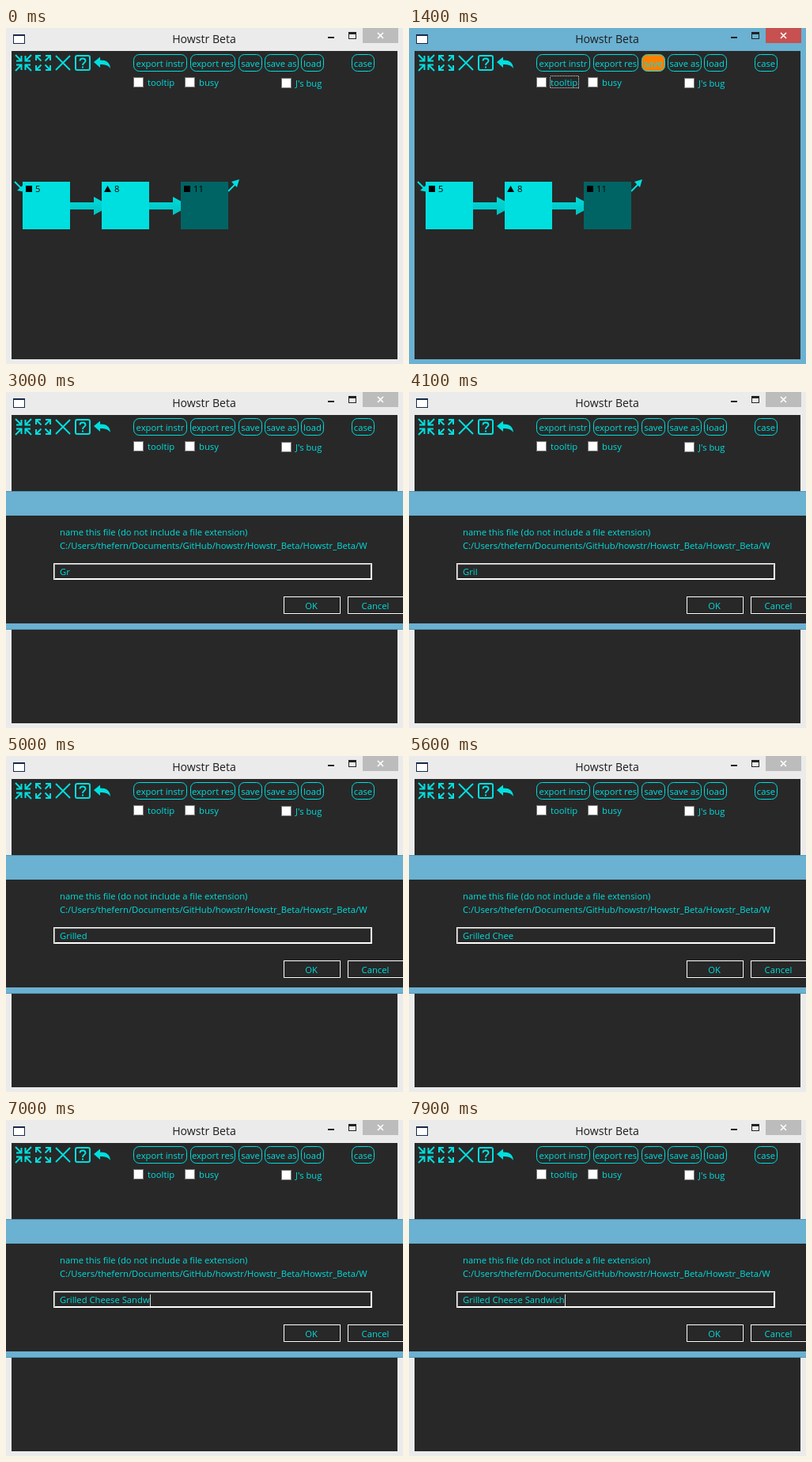
Animation, 502 px wide and 424 px high, one loop 8000 ms. Source, as an HTML page:

```html
<!DOCTYPE html>
<html lang="en">
<head>
<meta charset="utf-8">
<title>Howstr Beta</title>
<style>
  html, body { margin: 0; width: 100%; height: 100%; overflow: hidden; background: #ebebeb; }
  svg { display: block; width: 502px; height: 424px; --cyan: #00dfdf; --body: #282828; --glass: #6bb1d1; }
  text { font: 11.25px "Open Sans", "Noto Sans", sans-serif; fill: var(--cyan); white-space: pre; }
  .title { font-size: 14.1px; fill: #1c1c1c; }
  .mid { text-anchor: middle; }
  .ink, .ink text { fill: #000; }
  .line { fill: none; stroke: var(--cyan); }
  .cyan { fill: var(--cyan); }
  .body { fill: var(--body); }
  .glass { fill: var(--glass); }
  .crisp { shape-rendering: crispEdges; }
  #frame { fill: #ebebeb; }
  #close { fill: #bcbcbc; }
  #focus { display: none; }
  .active #frame { fill: var(--glass); }
  .active #close { fill: #c75050; }
  .active #focus { display: inline; }
  .active #save { fill: #ff8000; }
</style>
</head>
<body>
<svg id="stage" viewBox="0 0 502 424">
  <defs>
    <linearGradient id="shade" x2="0" y2="1">
      <stop stop-color="#00dada"/><stop offset="1" stop-color="#00c2c2"/>
    </linearGradient>
    <clipPath id="pathClip"><rect x="62" y="184" width="401" height="20"/></clipPath>
    <g id="link">
      <path d="M0 7H30V0L51 11.5L30 23V16H0Z" fill="url(#shade)"/>
    </g>
    <g id="inward"><path d="M-10-10L-3-3M-9-2.5H-2.5V-9"/></g>
    <g id="outward"><path d="M-2.5-2.5L-9-9M-9-3V-9H-3"/></g>
  </defs>

  <!-- window -->
  <rect id="frame" width="502" height="424"/>
  <rect class="body crisp" x="7" y="29" width="488" height="389"/>
  <g class="crisp">
    <rect x="9" y="8" width="15" height="12" fill="#17294a"/>
    <rect x="10" y="10" width="13" height="9" fill="#fff"/>
    <rect id="close" x="451" width="45" height="19"/>
    <path d="M407 11H415V13H407Z" fill="#222"/>
    <path d="M433 5H443V14H433ZM434 8V13H442V8Z" fill="#222" fill-rule="evenodd"/>
  </g>
  <path d="M470 6L477 13M477 6L470 13" stroke="#fff" stroke-width="1.6"/>
  <text class="title mid" x="250.5" y="19">Howstr Beta</text>

  <!-- toolbar -->
  <g class="line" stroke-width="2">
    <g id="collapse" transform="translate(22 44)"></g>
    <g id="expand" transform="translate(47 44)"></g>
    <path d="M63 35L81 53M81 35L63 53"/>
    <rect x="88" y="35" width="18" height="18" rx="2"/>
    <path d="M93.5 41.5C93.5 37.5 100.5 37.5 100.5 41.5C100.5 44 97 43.5 97 47M97 48.5V50.5"/>
  </g>
  <path class="cyan" d="M111 43L119 36.5V40.5C127 40.5 131.5 43.5 132 51C129 46.8 125 46 119 46V50Z"/>
  <g id="buttons"></g>
  <g id="checks"></g>
  <rect id="focus" class="crisp" x="178.500" y="60.500" width="36" height="15" fill="none" stroke="#ddd" stroke-dasharray="1 1"/>

  <!-- graph -->
  <use href="#link" x="81" y="213"/>
  <use href="#link" x="181" y="213"/>
  <path class="line" stroke-width="2" d="M11 194L20 203M281 206L291 196"/>
  <path class="cyan" d="M14 205L22 198L24 207ZM295 191L285 194L292 201Z"/>
  <g class="crisp">
    <rect class="cyan" x="21" y="194" width="60" height="60"/>
    <rect class="cyan" x="121" y="194" width="60" height="60"/>
    <rect x="221" y="194" width="60" height="60" fill="#006464"/>
  </g>
  <g class="ink">
    <path d="M25 199H33V207H25ZM124 207L128.500 199L133 207ZM225 199H233V207H225Z"/>
    <text x="37" y="207">5</text>
    <text x="137" y="207">8</text>
    <text x="237" y="207">11</text>
  </g>

  <!-- save dialog -->
  <g id="dialog">
    <g class="crisp">
      <rect class="glass" y="125" width="502" height="175"/>
      <path d="M0 125.500H502M0 299.500H502" stroke="#5596b4"/>
      <rect class="body" y="156" width="502" height="136"/>
      <rect x="61" y="217" width="401" height="19" fill="none" stroke="#fff" stroke-width="2"/>
      <path d="M61.500 236V217.500H462" fill="none" stroke="#a0a0a0"/>
      <g fill="none" stroke="#fff">
        <rect x="351.500" y="258.500" width="71" height="21"/>
        <rect x="432.500" y="258.500" width="71" height="21"/>
      </g>
      <path d="M352 278.500H421.500V259M433 278.500H502" fill="none" stroke="#111"/>
    </g>
    <text x="68" y="181">name this file (do not include a file extension)</text>
    <text x="68" y="198" clip-path="url(#pathClip)">C:/Users/thefern/Documents/GitHub/howstr/Howstr_Beta/Howstr_Beta/W</text>
    <text id="entry" x="68" y="231"></text>
    <rect id="caret" class="crisp" y="220" width="1" height="15" fill="#d8d8d8"/>
    <text class="mid" x="386" y="274">OK</text>
    <text class="mid" x="467" y="274">Cancel</text>
  </g>
</svg>
<script>
  const LOOP = 8000, ACTIVE_AT = 1400, DIALOG_AT = 1600;
  const FILE_NAME = "Grilled Cheese Sandwich";
  // times in ms of each typed character, and of each caret toggle (first one shows it)
  const KEYS = [2500, 2700, 3600, 4100, 4200, 4300, 4500, 4500, 5200, 5400, 5500, 5600,
    5800, 5900, 6000, 6400, 6500, 6600, 6700, 7000, 7200, 7300, 7400];
  const BLINKS = [1600, 2100, 2600, 3000, 3500, 4000, 4500, 5000, 5200, 5400, 5900, 6400, 6900, 7400, 7900];

  const $ = id => document.getElementById(id);
  const fourWays = shape => [0, 90, 180, 270]
    .map(a => `<use href="#${shape}" transform="rotate(${a})"/>`).join("");

  $("collapse").innerHTML = fourWays("inward");
  $("expand").innerHTML = fourWays("outward");

  $("buttons").innerHTML = [
    ["export instr", 161, 68], ["export res", 233, 57], ["save", 294, 30],
    ["save as", 327, 43], ["load", 373, 29], ["case", 437, 29]
  ].map(([label, x, w]) => `
    <rect ${label === "save" ? 'id="save"' : ""} class="line" x="${x + 0.5}" y="33.5" width="${w - 1}" height="21" rx="7"/>
    <text class="mid" x="${x + w / 2}" y="49">${label}</text>`).join("");

  $("checks").innerHTML = [["tooltip", 161, 62], ["busy", 226, 62], ["J's bug", 348, 63]]
    .map(([label, x, y]) => `
    <rect class="crisp" x="${x + 0.5}" y="${y + 0.5}" width="12" height="12" fill="#fff" stroke="#777"/>
    <text x="${x + 18}" y="${y + 11}">${label}</text>`).join("");

  const stage = $("stage"), dialog = $("dialog"), entry = $("entry"), caret = $("caret");
  const countPast = (times, t) => times.filter(at => at <= t).length;

  function draw() {
    const t = performance.now() % LOOP;
    stage.classList.toggle("active", t >= ACTIVE_AT && t < DIALOG_AT);
    dialog.style.visibility = t >= DIALOG_AT ? "visible" : "hidden";

    const typed = FILE_NAME.slice(0, countPast(KEYS, t));
    if (entry.textContent !== typed) entry.textContent = typed;
    caret.setAttribute("x", 68 + Math.round(typed ? entry.getComputedTextLength() : 0));
    caret.style.display = countPast(BLINKS, t) % 2 ? "inline" : "none";
    requestAnimationFrame(draw);
  }
  draw();
</script>
</body>
</html>
```
